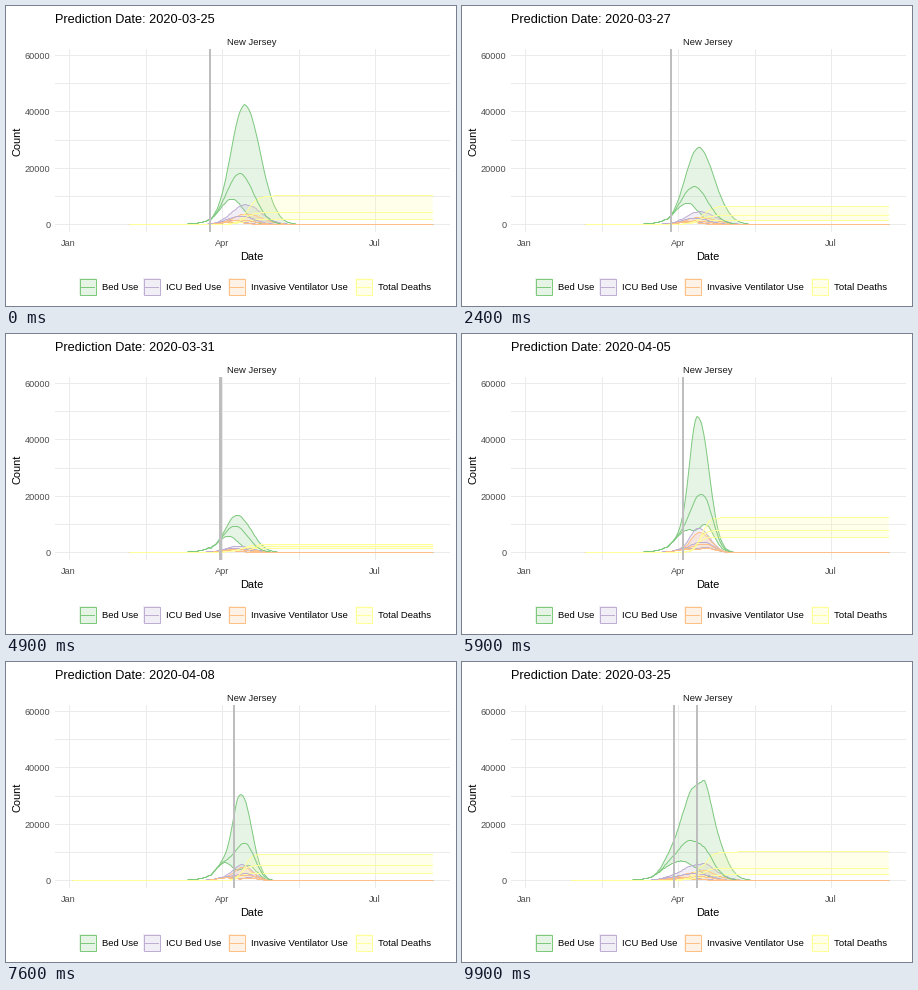
These frames come from a looping animation (450x300 px, 10000 ms). A matplotlib script:

```python
import numpy as np
import matplotlib.pyplot as plt
from matplotlib.animation import FuncAnimation
from matplotlib.patches import Polygon, Rectangle

W, H, DPI = 450, 300, 100
PX = 72 / DPI                      # points per pixel
FRAMES, STEP = 100, 100
LEFT, RIGHT, TOP, BOTTOM = 49, 444, 43, 226
JAN1, DAY = 63.5, 1.681            # x of 1 January, pixels per day
ZERO, TEN_K = 218.6, 28.2          # y of zero, pixels per 10000
COLORS = ["#7FC97F", "#BEAED4", "#FDC086", "#FFFF99"]
NAMES = ["Bed Use", "ICU Bed Use", "Invasive Ventilator Use", "Total Deaths"]
DAYS = [84, 85, 86, 88, 89, 90, 91, 95, 97, 98, 100, 102]   # prediction dates
LINGER = {90, 102}                 # days whose line stays while a copy moves
SEEN = (84, 1950)                  # last observed day and its count


def bell(d, height, peak, left, right):
    s = np.where(d < peak, left, right)
    return height * np.exp(-((d - peak) / s) ** 2 / 2)


def rise(height, peak, through):
    """Width of the bell that passes through a given (day, count)."""
    day, count = through
    return (peak - day) / np.sqrt(2 * np.log(height / count))


def observed(d):
    return np.where(d < SEEN[0], SEEN[1] * np.exp(0.17 * (d - SEEN[0])), 0)


def fan(heights, peaks, through):
    """Low, mean and high bells that all leave one observed point."""
    def beds(d):
        out, floor = [], observed(d)
        for h, p, skew in zip(heights, peaks, (0.92, 1, 1.13)):
            s = rise(h, p, through)
            floor = np.maximum(floor, bell(d, h, p, s, s * skew))
            out.append(floor)
        return out
    return beds


def stack(known, second, mean, up):
    """Two-humped low curve, with mean and high bells added on top."""
    def beds(d):
        s = rise(*known, SEEN)
        low = np.maximum(observed(d), bell(d, *known, s, s)) + bell(d, *second, 3.8, 4.8)
        return [low, low + bell(d, *mean, 4.3, 6.5), low + bell(d, *up, 4.2, 6)]
    return beds


def measures(beds, icu, vent, deaths, end, pace, first=36):
    """Rows: day, then low / mean / high for each of the four measures."""
    d = np.arange(first, 217.0)
    rows = [d, *beds(d)]
    rows += [icu * c for c in beds(d - 0.5)]
    rows += [vent * c for c in beds(d - 1)]
    rows += [n / (1 + np.exp((end - lag - d) / pace)) for n, lag in zip(deaths, (3, 2, 0))]
    return np.array(rows)


def forecast(day):
    if day < 88:
        beds = fan((9000, 18000, 42500), (96.7, 101.4, 104.2), SEEN)
        return measures(beds, 0.165, 0.088, (1800, 4300, 10200), 106, 3)
    if day < 92:
        k = day - 88
        beds = fan((6300 - 250 * k, 9400, 13600 - 200 * k),
                   (95.5 - 0.4 * k, 98.4, 99.7), (87, 3000))
        return measures(beds, 0.17, 0.115, (1400, 2100, 2900), 102, 4)
    if day < 98:
        beds = stack((8900, 97.3), (9500, 108), (13800, 103), (50000, 102))
        return measures(beds, 0.18, 0.15, (6700, 9700, 15500), 105, 2)
    k = (day - 98) / 4
    beds = stack((6300, 92.5), (5200 - 2200 * k, 106.5), (8700 - 700 * k, 102 - 2 * k),
                 (26700, 101.4 - 1.8 * k))
    return measures(beds, 0.185, 0.15, (2600, 5300 - 900 * k, 9300 + 700 * k), 104, 2, 2)


def grow(m, n):
    """Add points to a path by splitting its longest segments."""
    count = m.shape[1]
    seg = np.hypot(np.diff(m[0]), np.diff(m[2]))
    parts = np.ones(count - 1, dtype=int)
    for _ in range(n - count):
        parts[np.argmax(seg / parts)] += 1
    pos = np.concatenate([i + np.arange(p) / p for i, p in enumerate(parts)] + [[count - 1]])
    return np.array([np.interp(pos, np.arange(count), row) for row in m])


def start(k):
    """First frame at rest in state k; the early states last a frame longer."""
    return 8 * k + min(max(k - 1, 0), 4)


def moment(frame):
    """State index and the share of the way to the next state."""
    k = max(i for i in range(len(DAYS)) if start(i) <= frame)
    return k, max(0, 4 - (start(k + 1) - frame)) / 4


def px(day):
    return JAN1 + DAY * day


def py(count):
    """Centre of the pixel row that holds a count."""
    return np.floor(ZERO - count * TEN_K / 10000) + 0.5


def mark_x(day):
    return np.floor(203.82 + DAY * (day - 84))


def label(day):
    month, date = (3, day - 59) if day < 91 else (4, day - 90)
    return f"Prediction Date: 2020-{month:02d}-{date:02d}"


fig = plt.figure(figsize=(W / DPI, H / DPI), dpi=DPI, facecolor="white")
ax = fig.add_axes([0, 0, 1, 1])
ax.set_xlim(0, W)
ax.set_ylim(H, 0)
ax.axis("off")


def box(x, y, w, h, color, z=1, **kw):
    return ax.add_patch(Rectangle((x, y), w, h, fc=color, lw=0, aa=False, zorder=z, **kw))


def text(x, y, s, size, color="black", ha="left", va="baseline", **kw):
    return ax.text(x, y, s, fontsize=size * PX, color=color, ha=ha, va=va,
                   family="Liberation Sans", **kw)


def line(color, z, x=(), y=()):
    return ax.plot(x, y, color=color, lw=PX, zorder=z)[0]


# grid, axes and labels
for i in range(5):
    box(int(JAN1 + 76.5 * i), TOP, 1, BOTTOM - TOP, "#EBEBEB")
for i in range(7):
    y = py(10000 * i)
    box(LEFT, y - 0.5, RIGHT - LEFT, 1, "#EBEBEB")
    if i % 2 == 0:
        text(44.5, y + 3.4, str(10000 * i), 9.2, "#4D4D4D", "right")
for i, month in enumerate(("Jan", "Apr", "Jul")):
    text(62.7 + 153 * i, 240, month, 9.2, "#4D4D4D", "center")
text(246, 254, "Date", 11, ha="center")
text(11.5, 135.5, "Count", 11, ha="center", va="center", rotation=90)
text(246, 39, "New Jersey", 9.5, "#1A1A1A", "center")
title = text(49, 17, "", 12.8)

# legend
for x, name, c in zip((73, 137, 222, 349), NAMES, COLORS):
    box(x, 272, 17, 17, c, alpha=0.2)
    a, b = x + 0.5, x + 16.5
    line(c, 2, [a, b, b, a, a], [272.5, 272.5, 288.5, 288.5, 272.5])
    line(c, 2, [x + 2, x + 15], [280.5, 280.5])
    text(x + 22.8, 284.5, name, 9.5)

# moving parts
ribbons = [ax.add_patch(Polygon([[0, 0]], fc=c, alpha=0.2, lw=0, zorder=3 + i))
           for i, c in enumerate(COLORS)]
curves = [[line(c, z + i) for z in (3.2, 8, 3.2)] for i, c in enumerate(COLORS)]
marks = [box(0, TOP, 2, BOTTOM - TOP, "#BEBEBE", 15) for _ in range(2)]
paths = [forecast(day) for day in DAYS]


def draw(frame):
    k, t = moment(frame)
    nxt = (k + 1) % len(DAYS)
    day, day2 = DAYS[k], DAYS[nxt]
    a, b = paths[k], paths[nxt]
    n = max(a.shape[1], b.shape[1])
    m = a if t == 0 else (1 - t) * grow(a, n) + t * grow(b, n)
    x = px(m[0])
    for i, (ribbon, trio) in enumerate(zip(ribbons, curves)):
        ys = py(m[1 + 3 * i:4 + 3 * i])
        for ln, y in zip(trio, ys):
            ln.set_data(x, y)
        ribbon.set_xy(np.column_stack([np.append(x, x[::-1]), np.append(ys[2], ys[0][::-1])]))
    marks[0].set_x(mark_x(day + t * (day2 - day)))
    marks[1].set_x(mark_x(day))
    marks[1].set_visible(day in LINGER and t > 0)
    title.set_text(label(day2 if t > 0.5 else day))
    return []


anim = FuncAnimation(fig, draw, frames=FRAMES, interval=STEP, init_func=lambda: draw(0),
                     repeat=True, repeat_delay=0)
plt.show()
```
